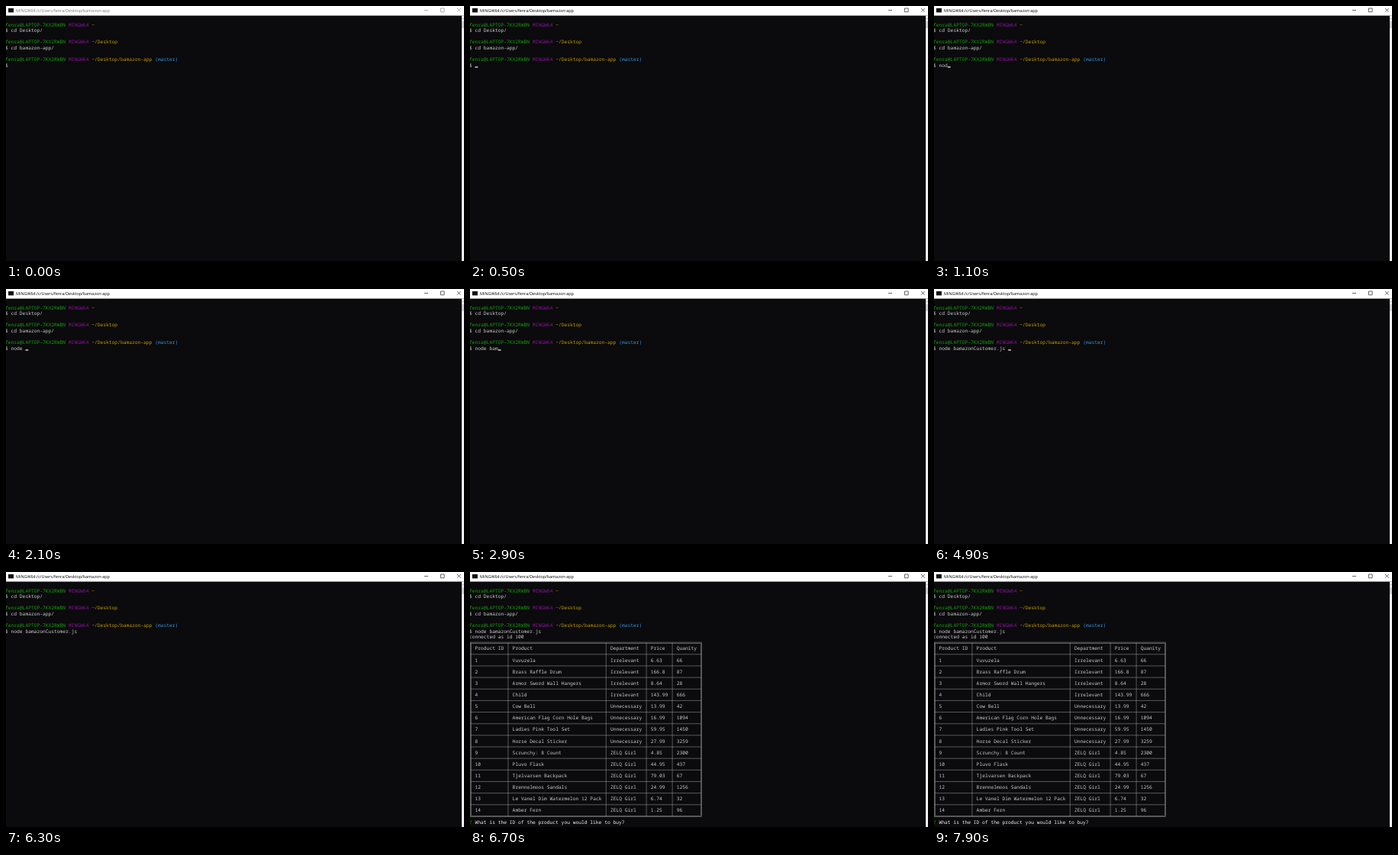
Recreate the animation shown at these times as an HTML page. Size 600x334 px, loop 8 s.

```html
<!DOCTYPE html>
<html lang="en">
<head>
<meta charset="utf-8">
<title>Terminal</title>
<style>
  html, body { margin: 0; width: 100%; height: 100%; overflow: hidden; background: #0b0a0c; }
  svg { display: block; width: 100%; height: 100%; }
  text { white-space: pre; text-rendering: geometricPrecision; }
  .term text { font: 6.29px "Noto Sans Mono", monospace; }
  .caption { font: 5.42px "Open Sans", sans-serif; }
</style>
</head>
<body>
<svg id="stage" viewBox="0 0 600 334">
  <rect width="600" height="334" fill="#0b0a0c"/>
  <rect width="600" height="12.6" fill="#fff"/>
  <rect x="3" y="3" width="7" height="5.4" fill="#111"/>
  <g id="bar">
    <text class="caption" x="13" y="7.5" fill="currentColor">MINGW64:/c/Users/fenra/Desktop/bamazon-app</text>
    <path d="M548 5.5h5 M569.5 3h4.6v4.8h-4.6z M591 3l4.8 4.8 M595.8 3l-4.8 4.8"
      fill="none" stroke="currentColor" stroke-width=".6"/>
  </g>
  <rect x="597" y="12.6" width="3" height="321.4" fill="#f0f0f0"/>
  <path d="M597.4 17.4l1.1-1.3 1.1 1.3" fill="none" stroke="#606060" stroke-width=".5"/>
  <rect x="597" y="20" width="3" height="9" fill="#cdcdcd"/>
  <g class="term" id="shell"></g>
  <g class="term" id="output"></g>
  <rect id="cursor" width="3.77" height="1.3" fill="#eee"/>
</svg>
<script>
const NS = 'http://www.w3.org/2000/svg';
const LEFT = -1, CELL = 3.774, TOP = 24.5, LINE = 7.575, LOOP = 8000;
const GREY = '#ccc', GREEN = '#13a10e', PURPLE = '#881798', GOLD = '#c19c00', BLUE = '#3a96dd', WHITE = '#f2f2f2';
const RULE = '#a8a8a8';

const get = id => document.getElementById(id);
const shell = get('shell'), output = get('output'), cursor = get('cursor'), bar = get('bar');
const colX = col => LEFT + col * CELL;
const midX = col => colX(col + 0.5);
const rowY = row => TOP + row * LINE;

function add(parent, tag, attrs) {
  const node = document.createElementNS(NS, tag);
  for (const key in attrs) node.setAttribute(key, attrs[key]);
  return parent.appendChild(node);
}

function print(parent, col, row, str, fill = GREY) {
  const node = add(parent, 'text', { x: colX(col), y: rowY(row) + 2.1, fill });
  node.textContent = str;
  return node;
}

function prompt(row, path, branch) {
  print(shell, 0, row, 'fenra@LAPTOP-7KX2RWBN', GREEN);
  print(shell, 22, row, 'MINGW64', PURPLE);
  print(shell, 30, row, path, GOLD);
  if (branch) print(shell, 31 + path.length, row, branch, BLUE);
}

prompt(0, '~');
print(shell, 0, 1, '$ cd Desktop/');
prompt(3, '~/Desktop');
print(shell, 0, 4, '$ cd bamazon-app/');
prompt(6, '~/Desktop/bamazon-app', '(master)');
const command = print(shell, 0, 7, '$ ');

const products = `Product ID|Product|Department|Price|Quanity
1|Vuvuzela|Irrelevant|6.63|66
2|Brass Raffle Drum|Irrelevant|166.8|87
3|Armor Sword Wall Hangers|Irrelevant|8.64|28
4|Child|Irrelevant|143.99|666
5|Cow Bell|Unnecessary|13.99|42
6|American Flag Corn Hole Bags|Unnecessary|16.99|1094
7|Ladies Pink Tool Set|Unnecessary|59.95|1450
8|Horse Decal Sticker|Unnecessary|27.99|3259
9|Scrunchy: 8 Count|ZELQ Girl|4.85|2300
10|Pluvo Flask|ZELQ Girl|44.95|437
11|Tjelvarsen Backpack|ZELQ Girl|79.03|67
12|Brennelmoos Sandals|ZELQ Girl|24.99|1256
13|Le Vanel Dim Watermelon 12 Pack|ZELQ Girl|6.74|32
14|Amber Fern|ZELQ Girl|1.25|96`.split('\n').map(line => line.split('|'));

function drawTable(row) {
  const edges = [0, 13, 47, 61, 70, 80];
  const last = row + products.length * 2;
  const left = midX(0), right = midX(80), top = rowY(row), bottom = rowY(last);
  let rules = '';
  products.forEach((cells, i) => {
    cells.forEach((cell, j) => print(output, edges[j] + 2, row + 1 + 2 * i, cell));
    if (i) rules += `M${left} ${rowY(row + 2 * i)}H${right}`;
  });
  for (const col of edges.slice(1, -1)) rules += `M${midX(col)} ${top}V${bottom}`;
  add(output, 'path', { d: rules, stroke: RULE, 'stroke-width': 0.5 });
  for (const gap of [-0.6, 0.6]) {
    add(output, 'rect', {
      x: left - gap, y: top - gap, width: right - left + 2 * gap, height: bottom - top + 2 * gap,
      fill: 'none', stroke: RULE, 'stroke-width': 0.5
    });
  }
}

print(output, 0, 8, 'connected as id 100');
drawTable(9);
print(output, 0, 40, '?', GREEN);
print(output, 2, 40, 'What is the ID of the product you would like to buy?', WHITE);

// [start ms, typed text, cursor: 1 after the text, 0 hidden, or [col, row]]
const full = 'node bamazonCustomer.js ';
const steps = [
  [0, '', 0],
  [500, '', 1],
  [700, 'n', 1],
  [900, 'no', 1],
  [1100, 'nod', 1],
  [1300, 'node', 1],
  [1500, 'node', 0],
  [1900, 'node', 1],
  [2100, 'node ', 1],
  [2500, 'node b', 1],
  [2700, 'node ba', 1],
  [2900, 'node bam', 1],
  [3100, 'node bama', 1],
  [3500, 'node bama', 0],
  [3900, 'node bamazon', 1],
  [4100, 'node bamazon', 0],
  [4500, 'node bamazonC', 1],
  [4700, 'node bamazonCu', 1],
  [4900, full, 1],
  [5100, full, 0],
  [5700, full, [0, 8]],
  [6300, full, 0],
  [7300, full, [55, 40]],
  [7900, full, 0]
];

function render(time) {
  const [, typed, mark] = steps.findLast(step => step[0] <= time);
  command.textContent = '$ ' + typed;
  bar.style.color = time < 500 ? '#777' : '#000';
  output.style.display = time < 6700 ? 'none' : '';
  cursor.style.display = mark ? '' : 'none';
  const [col, row] = mark.length ? mark : [typed.length + 2, 7];
  cursor.setAttribute('x', colX(col));
  cursor.setAttribute('y', rowY(row) + 1.8);
}

const start = performance.now();
function tick() {
  render((performance.now() - start) % LOOP);
  requestAnimationFrame(tick);
}
tick();
</script>
</body>
</html>
```
